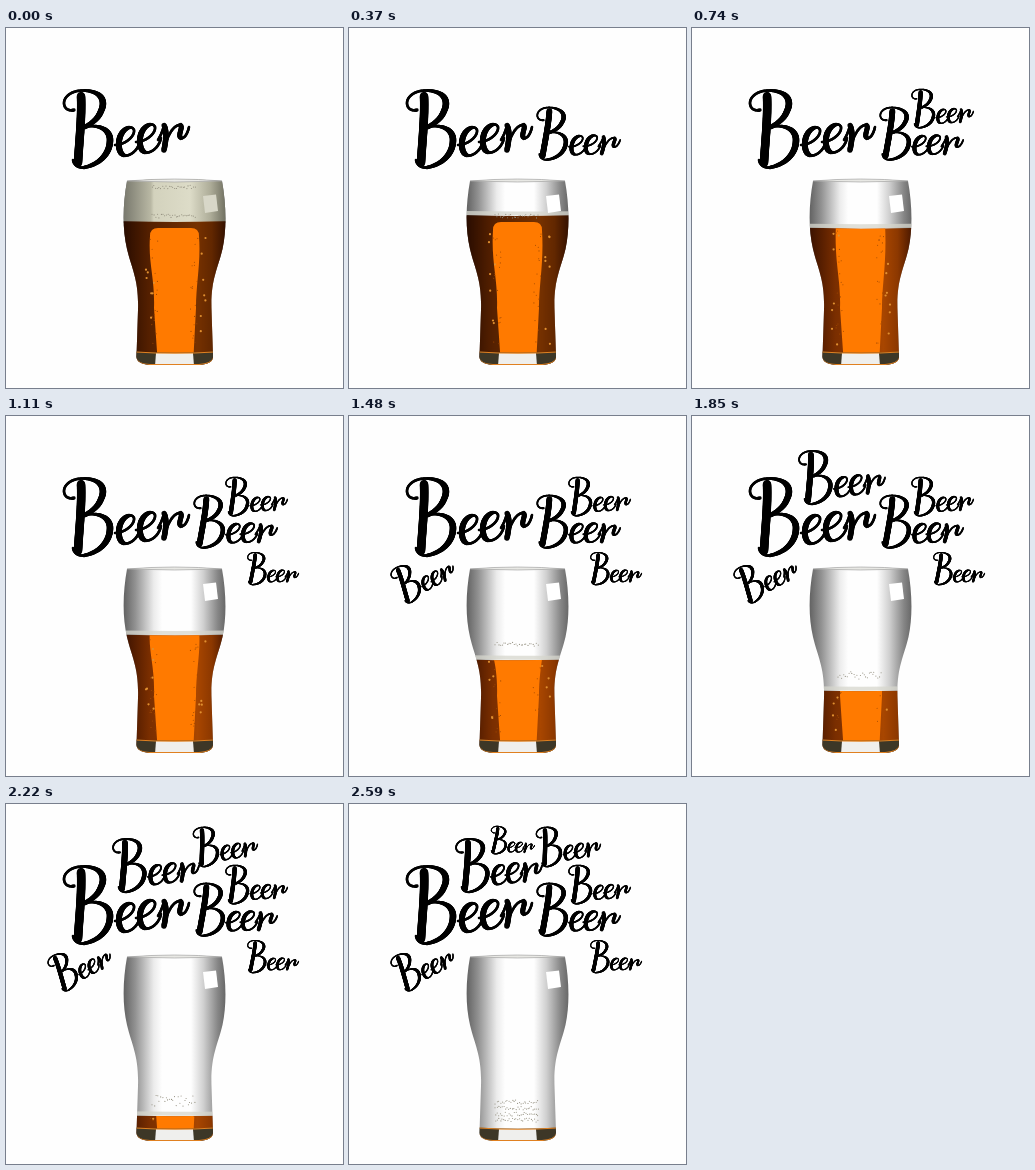
An HTML page that plays this animation: 337x360 px, repeating every 2.96 s.

```html
<!DOCTYPE html>
<html lang="en">
<head>
<meta charset="utf-8">
<title>Beer</title>
<style>
html, body { margin: 0; width: 100%; height: 100%; overflow: hidden; background: #fefefe; }
svg { display: block; width: 100%; height: 100%; }
</style>
</head>
<body>
<svg viewBox="0 0 337 360" role="img" aria-label="Beer">
  <defs>
    <g id="word" stroke="#000" stroke-linecap="round" fill="none"></g>
    <path id="shape" d="M121 153C117 175 116 200 121 221C126 242 133 252 132 282L130.500 328Q130 336 144 337H193.500Q207.500 336 207 328L205.500 282C204.500 252 211.500 242 216.500 221C221 200 220 175 216 153Q169 149 121 153Z"/>
    <clipPath id="inside"><use href="#shape"/></clipPath>
    <clipPath id="filled"><path id="level"/></clipPath>
    <linearGradient id="glass">
      <stop offset="0" stop-color="#606060"/>
      <stop offset=".12" stop-color="#929292"/>
      <stop offset=".3" stop-color="#ececec"/>
      <stop offset=".38" stop-color="#fefefe"/>
      <stop offset=".66" stop-color="#fefefe"/>
      <stop offset=".78" stop-color="#d0d0d0"/>
      <stop offset=".92" stop-color="#868686"/>
      <stop offset="1" stop-color="#666"/>
    </linearGradient>
    <linearGradient id="froth">
      <stop offset="0" stop-color="#77776c"/>
      <stop offset=".27" stop-color="#b9b8a4"/>
      <stop offset=".3" stop-color="#d3d2bd"/>
      <stop offset=".65" stop-color="#dddcc8"/>
      <stop offset=".85" stop-color="#adac98"/>
      <stop offset="1" stop-color="#6f6f60"/>
    </linearGradient>
    <linearGradient id="ale" gradientUnits="userSpaceOnUse" x1="118" x2="220">
      <stop offset="0" stop-color="#3c1200"/>
      <stop offset=".25" stop-color="#7a2e00"/>
      <stop offset=".72" stop-color="#a84600"/>
      <stop offset=".86" stop-color="#8c3800"/>
      <stop offset="1" stop-color="#4a1800"/>
    </linearGradient>
  </defs>
  <g clip-path="url(#inside)">
    <rect x="117" y="150" width="103" height="188" fill="url(#glass)"/>
    <rect id="head" x="117" y="151" width="103" height="44" fill="url(#froth)"/>
    <g clip-path="url(#filled)">
      <rect x="117" y="150" width="103" height="188" fill="url(#ale)"/>
      <rect id="shade" x="117" y="150" width="103" height="188" opacity=".3"/>
      <path id="glow" fill="#ff7a00"/>
      <g id="bubbles"></g>
    </g>
    <path id="rim" fill="none" stroke="#d6d6cc" stroke-opacity=".75" stroke-width="4"/>
    <path d="M128 323.500Q169 326 210 323.500V338H128Z" fill="#3d3727"/>
    <path d="M150 325H187L188 338H149Z" fill="#efefed"/>
    <path d="M130 324Q169 326.500 208 324M130 330Q131 336 144 336.500H193Q206 336 207.500 330" fill="none" stroke="#e08020" stroke-width="1.2"/>
  </g>
  <g id="specks"></g>
  <path id="shine" d="M197 168L210 166.500L212 183L199 185Z"/>
  <path d="M121 153Q169 149 216 153Q169 155 121 153Z" fill="#e8e8e4" stroke="#999" stroke-width=".6"/>
  <g id="words"></g>
</svg>
<script>
const STEP = 370, COUNT = 8;
const $ = id => document.getElementById(id);

const E = "M109 117C118 117 129 109 128 102C126 96 114 101 113 114C112 126 118 130 125 126C130 123 133 118 134 113";
// Pen path, widest stroke
const LETTERS = [
  ["M68 82C60 84 56 77 59 71C64 62 78 61 87 64C97 67 99 75 95 83C92 91 86 95 79 99C92 96 104 101 104 112C104 126 93 136 80 139C74 141 68 138 67 132", 6.5],
  ["M75 68C76 90 73 115 72 135", 8.5],
  [E, 6], [E, 6, 21, -3],
  ["M152 112C155 107 157 102 158 97C161 104 160 112 158 122", 5.5],
  ["M159 117C163 105 168 97 174 97C178 98 171 108 175 110C179 111 182 104 183 99", 5]
];

// Pivot x, y, scale, turn
const WORDS = [
  [75, 101, 1, 0], [198, 105.5, .68, 6], [227.5, 80.5, .5, 4], [247.5, 152.5, .42, 7],
  [54.5, 169, .49, -20], [118.5, 61.5, .69, 1], [196.5, 43, .51, -2], [147, 36, .36, 9]
];

function rng(seed) {
  return () => (seed = (seed * 16807) % 2147483647) / 2147483647;
}

// A pointed pen: downward strokes swell, all others stay thin.
function pen([d, fat, dx = 0, dy = 0]) {
  const path = document.createElementNS("http://www.w3.org/2000/svg", "path");
  path.setAttribute("d", d);
  const length = path.getTotalLength(), n = Math.ceil(length / 1.2), thin = 2.6;
  let out = "";
  for (let i = 0; i < n; i++) {
    const a = path.getPointAtLength(length * i / n);
    const b = path.getPointAtLength(length * (i + 1) / n);
    const down = Math.max(0, (b.y - a.y) / (Math.hypot(b.x - a.x, b.y - a.y) || 1));
    const width = thin + (fat - thin) * down;
    out += `<path d="M${a.x + dx} ${a.y + dy}L${b.x + dx} ${b.y + dy}" stroke-width="${width.toFixed(2)}"/>`;
  }
  return out;
}

function dot(x, y, r, fill) {
  return `<circle cx="${x.toFixed(1)}" cy="${y.toFixed(1)}" r="${r}" fill="${fill}"/>`;
}

// The surface sinks faster as the glass narrows.
function surface(n) {
  const m = n - 1;
  return n ? 187 + 9.6 * m + 3.05 * m * m : 193;
}

function bubbles(n) {
  const rand = rng(71 + n * 97);
  let out = "";
  for (let i = 0; i < 50; i++) {
    const big = i < 14, right = i % 2;
    const x = (right ? 188 : 148) + (rand() - .5) * 8 + (big ? (right ? 9 : -4) : 0);
    out += dot(x, 203 + rand() * 114, big ? 1.1 : .55, big ? "#e09030" : "#a04800");
  }
  return out;
}

function specks(n, y) {
  if (n === 2 || n === 3) return "";
  const rand = rng(31 + n), empty = n === COUNT - 1;
  const row = (cy, tall) => {
    let out = "";
    for (let x = 146; x < 190; x += 1.7) out += dot(x + rand(), cy + (rand() - .5) * tall, .55, "#908c7c");
    return out;
  };
  if (empty) return [298, 304, 310, 316].map(cy => row(cy, 4)).join("");
  if (n < 2) return row(188, 4) + (n ? "" : row(159, 4));
  return row(y - 15, 4 + (n - 4) * 4);
}

function draw(n) {
  const y = surface(n), full = n === 0, fresh = n < 2;
  const top = fresh ? y + 7 : y - 4, round = fresh ? 8 : 0;
  const show = (id, on) => $(id).setAttribute("visibility", on ? "visible" : "hidden");
  $("level").setAttribute("d", `M110 ${y}Q169 ${y + 2} 228 ${y}V338H110Z`);
  $("glow").setAttribute("d", `M144 ${top + round}Q144 ${top} ${144 + round} ${top}H${193 - round}Q193 ${top} 193 ${top + round}
    C195 235 190 255 190 280L187 338H152L148 280C149 250 142 235 144 ${top + round}Z`);
  $("rim").setAttribute("d", `M110 ${y - 2}Q169 ${y - 1} 228 ${y - 2}`);
  show("rim", !full && y < 325);
  show("head", full);
  show("shade", fresh);
  $("shine").setAttribute("fill", full ? "#d8d7c8" : "#fff");
  $("bubbles").innerHTML = bubbles(n);
  $("specks").innerHTML = specks(n, y);
  [...$("words").children].forEach((w, i) => w.setAttribute("visibility", i <= n ? "visible" : "hidden"));
}

$("word").innerHTML = LETTERS.map(pen).join("");
$("words").innerHTML = WORDS.map(([x, y, s, a]) =>
  `<use href="#word" transform="translate(${x} ${y}) rotate(${a}) scale(${s}) translate(-75 -101)"/>`).join("");

let shown = 0;
const start = performance.now();
draw(0);

function tick() {
  const n = Math.floor((performance.now() - start) / STEP) % COUNT;
  if (n !== shown) draw(shown = n);
  requestAnimationFrame(tick);
}
requestAnimationFrame(tick);
</script>
</body>
</html>
```
